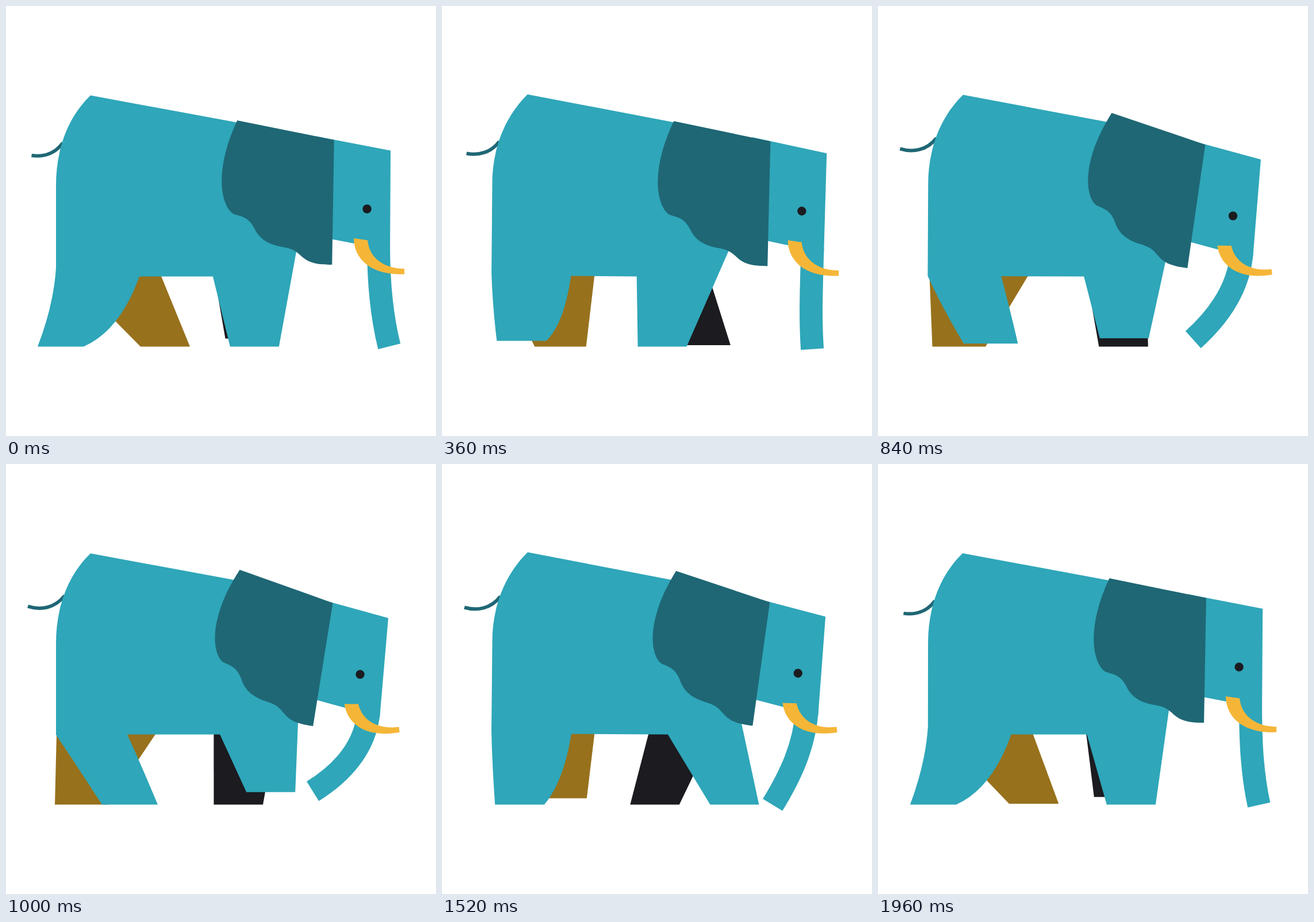
An HTML page for the animation above (2 s loop, 748 by 748 pixels).

```html
<!DOCTYPE html>
<html lang="en">
<head>
<meta charset="utf-8">
<title>Walking elephant</title>
<style>
  html, body { margin: 0; width: 100%; height: 100%; overflow: hidden; background: #fff; }
  svg { display: block; width: 100vw; height: 100vh; }
  .skin { fill: #2fa6b9; }
  .dark { fill: #1f6775; }
  .brown { fill: #97711c; }
  .black { fill: #1b1b20; }
  .gold { fill: #f5b638; }
  .line { fill: none; stroke: #2fa6b9; stroke-width: 40; }
  .tail { stroke: #1f6775; stroke-width: 6; }
</style>
</head>
<body>
<svg viewBox="0 0 748 748">
  <path id="tail" class="line tail"/>
  <path id="farHind" class="brown"/>
  <path id="farFront" class="black"/>
  <path id="body" class="skin"/>
  <!-- head origin: top right corner -->
  <g id="head">
    <path class="skin" d="M-130-25 0 0-1 174-61 162-140 147Z"/>
    <circle class="black" cx="-41" cy="101.500" r="7.7"/>
  </g>
  <path id="trunk" class="line"/>
  <!-- ear origin: top right corner -->
  <path id="ear" class="dark" d="M0 0-168.5-34C-185 2-195.5 37-195.5 72C-195.5 102-185 125-173 129.500C-156 134-148 137-139 153C-130 172-116 181-91 186C-71 189-66 194-57 202C-44 214-30 217-3.500 217Z"/>
  <!-- tusk origin: middle of the root -->
  <path id="tusk" class="gold" d="M-12-2C-12 34 18 63 76 60.500V51C43 51 15 34 12 1.500Z"/>
</svg>
<script>
const LOOP = 2000, HALF = LOOP / 2, STEP = 40;
const BELLY = 470.5, GROUND = 592.5;

const wave = (t, peak) => Math.cos(Math.PI * (t - peak) / HALF);
const rad = deg => deg * Math.PI / 180;
const mix = (a, b, k) => a + (b - a) * k;

function ramp(t, from, to) {
  const u = Math.min(1, Math.max(0, (t - from) / (to - from)));
  return (1 - Math.cos(Math.PI * u)) / 2;
}

// Down, a short rest, and up again.
const nod = (t, start) => ramp(t, start, HALF) * (1 - ramp(t, 1360, LOOP));

// Hind foot, 0 = back, 1 = front: an even swing, then a push that slows down.
const stride = t => t < HALF ? t / HALF : (2 - t / HALF) ** 1.5;

const bounce = t => Math.abs(Math.sin(Math.PI * t / HALF));
const hindLift = t => t < HALF ? 11 * bounce(t) : 0;

function frontLift(t) {
  const u = (t - 560) / 930;
  return u > 0 && u < 1 ? Math.sin(Math.PI * u) ** 2 : 0;
}

const el = id => document.getElementById(id);
const draw = (id, d) => el(id).setAttribute("d", d);
const place = (id, x, y, turn) =>
  el(id).setAttribute("transform", `translate(${x} ${y}) rotate(${turn})`);

function drawBody(t) {
  const bob = bounce(t);
  const topX = 147 + 2 * bob, topY = 155.5 - 2 * bob;

  const reach = wave(t, 1430);
  const foot = 404 + 65 * reach, hip = 366 + 28 * reach;
  const frontY = GROUND - 22 * frontLift(t);

  const s = stride(t);
  const hindY = GROUND - hindLift(t);
  const kneeY = 455 + 16 * Math.sqrt(s);

  draw("body", `M${topX} ${topY}L480 217 510 400
    L${foot + 85} ${frontY}H${foot}L${hip} ${BELLY}L${mix(232, 211, s)} ${BELLY - bob}
    Q${mix(198, 238, s)} ${mix(565, 530, s)} ${mix(135, 264, s)} ${hindY}H${mix(55, 167, s)}
    Q${mix(83, 120, s * s)} 520 ${87 - bob} ${kneeY}L${87 + bob / 2} ${312 - 4 * bob}
    C${87 + bob / 2} 252 ${106 + bob} 195 ${topX} ${topY}Z`);
}

function drawFarLegs(t) {
  const later = (t + HALF) % LOOP;
  const leg = (id, hipL, hipR, footL, footR, y) =>
    draw(id, `M${hipL} 470V465H${hipR}V470L${footR} ${y}H${footL}Z`);

  const s = stride(later);
  leg("farHind", mix(88, 113, s), mix(260, 270, s), mix(85, 234, s), mix(178, 320, s),
    GROUND - hindLift(later));

  const reach = wave(later, 1430), foot = 371.5 + 46 * reach;
  leg("farFront", 362 + 3 * reach, 468 - 4 * reach, foot, foot + 85.5,
    GROUND - 14 * frontLift(later));
}

function drawHead(t) {
  const dip = nod(t, 0), flap = nod(t, 250);
  const x = 669 - 4 * dip + 1.5 * bounce(t), y = 251.5 + 16.5 * dip, turn = 4.6 * dip;
  const c = Math.cos(rad(turn)), s = Math.sin(rad(turn));
  const onHead = (px, py) => [x + px * c - py * s, y + px * s + py * c];

  place("head", x, y, turn);
  place("ear", ...onHead(-98.3, -18.5), 8.2 * flap);
  place("tusk", ...onHead(-52, 154.5), -8.4 * flap);

  const swing = wave(t, 100), tipTurn = rad(22 - 38 * swing);
  const tipX = 592 + 70 * swing + 9 * swing ** 2;
  const tipY = 597 + 12 * swing - 18 * swing ** 2;
  const bend = [tipX + 58 * Math.sin(tipTurn), tipY - 58 * Math.cos(tipTurn)];
  draw("trunk", `M${onHead(-21, 164)}C${onHead(-21, 228)} ${bend} ${tipX} ${tipY}`);
}

function drawTail(t) {
  const k = nod(t, 0);
  draw("tail", `M${44.5 - 6.5 * k} ${260 - 12.3 * k}C${66.5 - 6.5 * k} ${263 - 8.3 * k}
    ${86 - k} ${256 - 5 * k} ${99 + 3 * k} ${238 - 9 * k}`);
}

function render(now) {
  const t = Math.floor((now % LOOP) / STEP) * STEP;
  drawTail(t);
  drawFarLegs(t);
  drawBody(t);
  drawHead(t);
  requestAnimationFrame(render);
}
render(0);
</script>
</body>
</html>
```
